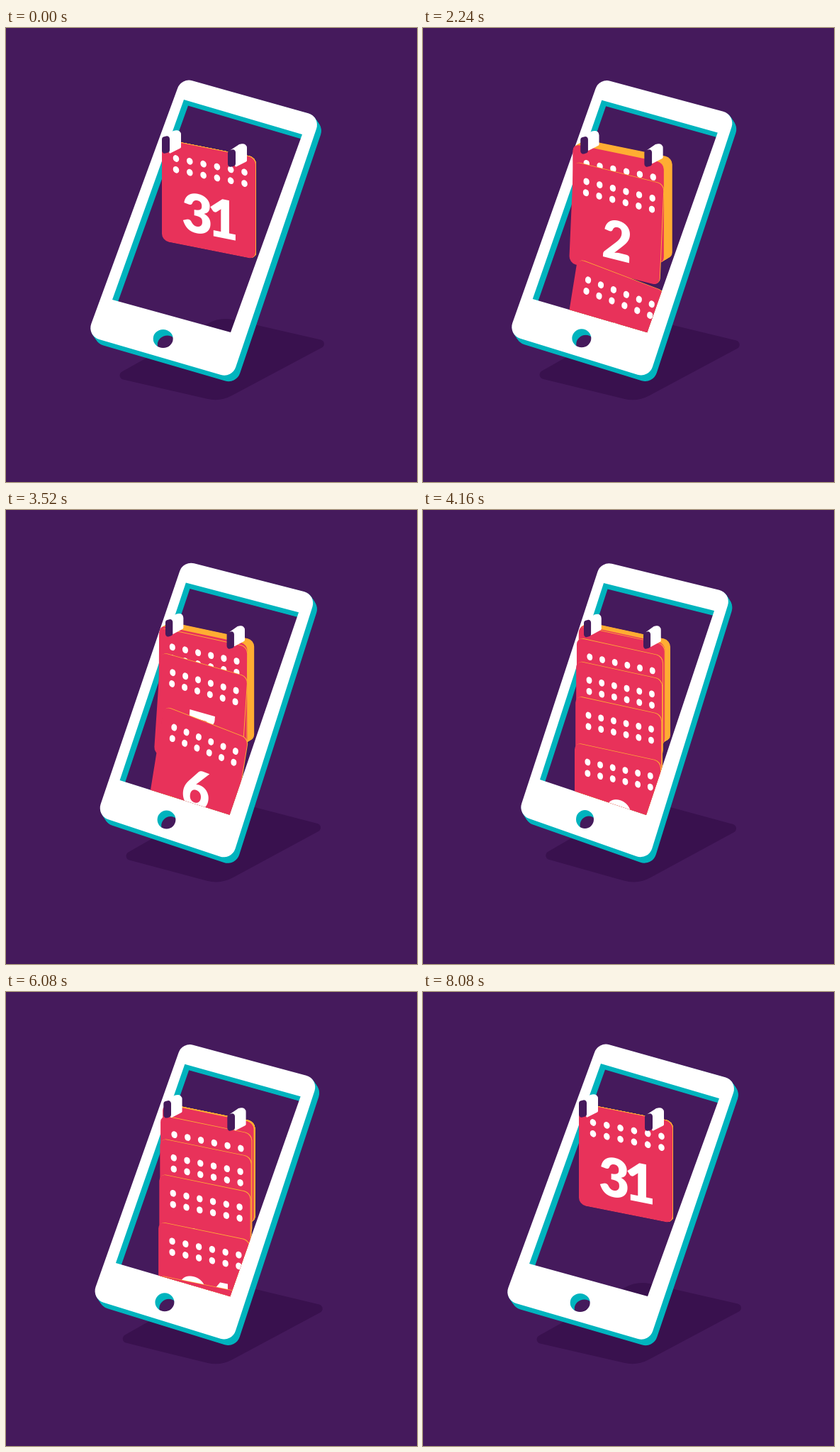
An HTML page with a canvas that plays this animation: 580x640 px, repeating every 9120 ms.

```html
<!DOCTYPE html>
<html lang="en">
<head>
<meta charset="utf-8">
<title>Phone calendar</title>
<style>
html, body { margin: 0; width: 100%; height: 100%; overflow: hidden; background: #451a5c; }
canvas { display: block; width: 580px; height: 640px; }
</style>
</head>
<body>
<canvas id="stage"></canvas>
<script>
const W = 580, H = 640, LOOP = 9120, STEP = 80, DAYS = 31;
const BG = '#451a5c', SHADE = '#39114e', TEAL = '#00b4be', RED = '#e8325a', ORANGE = '#ffad33', WHITE = '#fff';

const canvas = document.getElementById('stage');
const ctx = canvas.getContext('2d');
const ratio = window.devicePixelRatio || 1;
canvas.width = W * ratio;
canvas.height = H * ratio;

// How far the phone is turned, by time
const TURN = [[800, 0], [1520, .12], [2880, .49], [3680, .76], [4160, 1], [4240, 1.03],
  [4880, .72], [5600, .47], [6080, .33], [6560, .18], [7520, .04], [8080, 0]];
// When each day's page lets go, by day
const RELEASE = [[1, 1640], [2, 2000], [3, 2310], [4, 2556], [5, 2800], [8, 3435],
  [9, 3570], [18, 4760], [24, 5490], [27, 5897], [30, 6440]];

// Corner points facing the viewer and fully turned
const BODY = [[[247.6, 70], [443.8, 125], [319, 493.5], [114, 434]],
              [[251.3, 72], [435.5, 117], [318, 494], [134, 429.5]]];
const HOLE = [[[251, 101], [418, 150], [317, 429], [150, 383]],
              [[255, 103], [411, 142], [315, 430], [165, 380]]];
const SHADOW = [[[150, 492], [302, 407], [460, 443], [302, 527]],
                [[164, 489], [305, 407], [452, 447], [303, 528]]];

const mix = (a, b, s) => a + (b - a) * s;
const blend = ([a, b], s) => a.map((p, i) => [mix(p[0], b[i][0], s), mix(p[1], b[i][1], s)]);

function lookup(table, x) {
  if (x <= table[0][0]) return table[0][1];
  for (let i = 1; i < table.length; i++) {
    const [x0, y0] = table[i - 1], [x1, y1] = table[i];
    if (x <= x1) return mix(y0, y1, (x - x0) / (x1 - x0));
  }
  return table[table.length - 1][1];
}

function addRounded(pts, radii) {
  const n = pts.length, last = pts[n - 1];
  ctx.moveTo((last[0] + pts[0][0]) / 2, (last[1] + pts[0][1]) / 2);
  pts.forEach((p, i) => ctx.arcTo(...p, ...pts[(i + 1) % n], radii[i % radii.length]));
  ctx.closePath();
}

function addPoly(pts) {
  pts.forEach((p, i) => i ? ctx.lineTo(...p) : ctx.moveTo(...p));
  ctx.closePath();
}

function fillRounded(pts, radii, color) {
  ctx.beginPath();
  addRounded(pts, radii);
  ctx.fillStyle = color;
  ctx.fill();
}

function drawPhone(s) {
  const body = blend(BODY, s), hole = blend(HOLE, s);
  const depth = [mix(6, 5.5, s), mix(8.5, 8.5, s)];
  const layers = 12;
  for (let i = layers; i >= 0; i--) {
    ctx.save();
    ctx.translate(depth[0] * i / layers, depth[1] * i / layers);
    ctx.beginPath();
    addRounded(body, [17]);
    addPoly(hole);
    const bx = mix(221.7, 228.5, s), rx = mix(14, 12.5, s);
    ctx.moveTo(bx + rx, mix(438, 436, s));
    ctx.ellipse(bx, mix(438, 436, s), rx, 13, 0, 0, 7);
    ctx.fillStyle = i ? TEAL : WHITE;
    ctx.fill('evenodd');
    ctx.restore();
  }
}

// Maps flat page units onto the slanted calendar plane
function placePage(x, y, k, tilt = 0) {
  ctx.translate(x, y);
  if (tilt) {
    ctx.translate(66 * k, 52);
    ctx.rotate(tilt);
    ctx.translate(-66 * k, -52);
  }
  ctx.transform(k, .2, 0, 1, 0, 0);
}

function fillPage(color, dx = 0, dy = 0) {
  ctx.beginPath();
  ctx.roundRect(dx, dy, 132, 143, 9.5);
  ctx.fillStyle = color;
  ctx.fill();
}

function drawPage(day, x, y, k, tilt) {
  ctx.save();
  placePage(x, y, k, tilt);
  fillPage(ORANGE);
  fillPage(RED, -1, .8);
  ctx.fillStyle = WHITE;
  ctx.beginPath();
  for (let i = 0; i < 12; i++) {
    const u = 19 + 19.3 * (i % 6), v = 24.2 + (i < 6 ? 0 : 15.8);
    ctx.moveTo(u + 4.3, v);
    ctx.ellipse(u, v, 4.3, 4.8, 0, 0, 7);
  }
  ctx.fill();
  ctx.font = '900 75px Lato, "Open Sans", sans-serif';
  ctx.textAlign = 'center';
  const digits = String(day);
  [...digits].forEach((d, i) => ctx.fillText(d, 67 + 36.5 * (i - (digits.length - 1) / 2), 123));
  ctx.restore();
}

function drawRing(x, y, k, thick) {
  ctx.save();
  ctx.translate(x, y);
  ctx.scale(k, 1);
  const low = mix(17, 12, thick);
  fillRounded([[1, 3], [16, -7], [27, -9], [27, low], [11, low + 8]], [3, 6, 6, 2, 1], WHITE);
  fillRounded([[0, 2], [11, -1], [11, 23], [0, 26]], [4], BG);
  ctx.restore();
}

function drawCalendar(t, s) {
  const k = (132 - 11 * s) / 132;
  const x0 = 221 + 7 * s, y0 = 156 + s;
  const running = t >= 880 && t < 8080;
  const grow = running ? 1 - (1 - Math.min(1, (t - 800) / 560)) ** 2 : 0;

  const falling = [];
  let top = running ? 1 : DAYS;
  while (top < DAYS && lookup(RELEASE, top) <= t) falling.push(top++);

  const lift = day => grow * (DAYS - day) / (DAYS - 1);
  const thick = lift(top);
  const offX = -11.7 * thick, offY = 7 * thick;

  for (let i = 0; i <= 14; i++) {
    ctx.save();
    placePage(x0 + offX * i / 14, y0 + offY * i / 14, k);
    fillPage(ORANGE);
    ctx.restore();
  }
  drawPage(top, x0 + offX, y0 + offY, k);

  // Falling pages pass behind the right and lower frame
  const [, tr, br, bl] = blend(HOLE, s);
  ctx.save();
  ctx.beginPath();
  addPoly([[0, 0], [tr[0] + 40, 0], tr, br, bl, [0, bl[1]]]);
  ctx.clip();
  for (const day of falling.reverse()) {
    const age = (t - lookup(RELEASE, day)) / 1000;
    const drop = 475 * age * age;
    if (drop > 340) continue;
    const h = lift(day);
    const drift = -2.5 * Math.min(1, drop / 15) - .012 * drop;
    const tilt = day < 9 ? .16 * Math.min(1, drop / 100) : 0;
    drawPage(day, x0 - 11.7 * h + drift * (day < 9 ? .3 : 1), y0 + 7 * h + drop, k, tilt);
  }
  ctx.restore();

  drawRing(220 + 7 * s, 152 + 2.5 * s, k, thick);
  drawRing(313 - 2 * s, 171, k, thick);
}

function draw(time) {
  const t = Math.floor(time % LOOP / STEP) * STEP;
  const s = t < 880 ? 0 : lookup(TURN, t);
  ctx.setTransform(ratio, 0, 0, ratio, 0, 0);
  ctx.fillStyle = BG;
  ctx.fillRect(0, 0, W, H);
  fillRounded(blend(SHADOW, s), [6, 50, 6, 50], SHADE);
  drawPhone(s);
  drawCalendar(t, s);
}

const start = performance.now();
function tick() {
  draw(performance.now() - start);
  requestAnimationFrame(tick);
}
tick();
</script>
</body>
</html>
```
